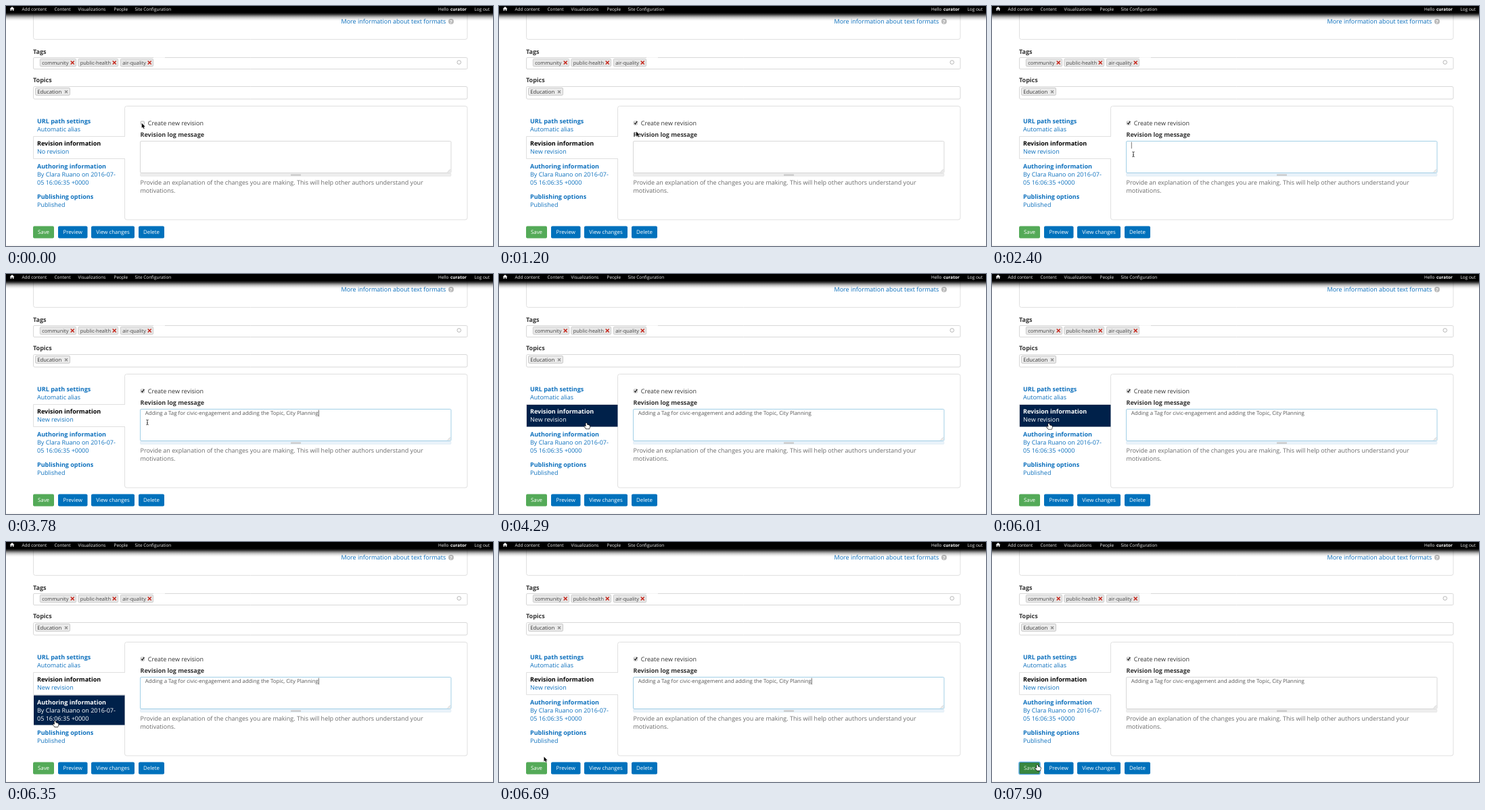
An HTML page with a canvas for the animation above (8 s loop, 720 by 356 pixels).

```html
<!DOCTYPE html>
<html lang="en">
<head>
<meta charset="utf-8">
<title>Revision form</title>
<style>
html, body { margin: 0; width: 100%; height: 100%; overflow: hidden; background: #fff; }
canvas { display: block; width: 720px; height: 356px; }
</style>
</head>
<body>
<canvas id="stage"></canvas>
<script>
const W = 720, H = 356, LOOP = 8000, STEP = 171.65;
const FONT = '"Open Sans", sans-serif';
const LINK = '#0d70bd', INK = '#333', GREY = '#6a6a6a', NAVY = '#00214a';
const EDGE = '#e0e0e0', FIELD = '#d8d8d8';
const MESSAGE = 'Adding a Tag for civic-engagement and adding the Topic, City Planning';
const CHECK_AT = 510, FOCUS_AT = 2050, TYPE_FROM = 2400, TYPE_TO = 3600, SAVE_AT = 7030;

const canvas = document.getElementById('stage');
const ctx = canvas.getContext('2d');
const dpr = window.devicePixelRatio || 1;
canvas.width = W * dpr;
canvas.height = H * dpr;
ctx.textRendering = 'geometricPrecision';

// Pointer stops: time, x, y
const PATH = [
  [0, 200.7, 173.8], [850, 200.7, 173.8], [1880, 209, 220], [3780, 209, 220],
  [4640, 84, 221.5], [6000, 84, 221.5], [6350, 72.5, 265.5],
  [6690, 66.5, 318.5], [7030, 67, 330.5], [LOOP, 67, 330.5]
];

const TABS = [
  { top: 160, bottom: 193.5, base: 174, title: 'URL path settings', lines: ['Automatic alias'] },
  { top: 193.5, bottom: 226.5, base: 207.2, title: 'Revision information', lines: [''], active: true },
  { top: 227, bottom: 271.5, base: 241.2, title: 'Authoring information', lines: ['By Clara Ruano on 2016-07-', '05 16:06:35 +0000'] },
  { top: 272, bottom: 306, base: 286.4, title: 'Publishing options', lines: ['Published'] }
];

const BUTTONS = [
  [40, 31, 'Save'], [77, 43.5, 'Preview'], [126, 64, 'View changes'], [196, 38, 'Delete']
];

function text(str, x, y, size = 9, color = INK, weight = 400, align = 'left') {
  ctx.font = `${weight} ${size}px ${FONT}`;
  ctx.fillStyle = color;
  ctx.textAlign = align;
  ctx.fillText(str, x, y);
}

function box(x, y, w, h, r, fill, stroke, line = 1) {
  ctx.beginPath();
  ctx.roundRect(x, y, w, h, r);
  if (fill) { ctx.fillStyle = fill; ctx.fill(); }
  if (stroke) { ctx.strokeStyle = stroke; ctx.lineWidth = line; ctx.stroke(); }
}

function poly(points, color, width) {
  ctx.beginPath();
  points.forEach(([x, y]) => ctx.lineTo(x, y));
  ctx.strokeStyle = color;
  ctx.lineWidth = width;
  ctx.stroke();
}

function cross(x, y, r, color, width) {
  poly([[x - r, y - r], [x + r, y + r]], color, width);
  poly([[x + r, y - r], [x - r, y + r]], color, width);
}

function circle(x, y, r, fill, stroke) {
  box(x - r, y - r, r * 2, r * 2, r, fill, stroke);
}

function toolbar() {
  const shade = ctx.createLinearGradient(0, 0, 0, 22);
  [[0, 1], [0.45, 1], [0.55, 0.82], [0.65, 0.52], [0.75, 0.27], [0.87, 0.09], [1, 0]]
    .forEach(([p, a]) => shade.addColorStop(p, `rgba(0,0,0,${a})`));
  ctx.fillStyle = shade;
  ctx.fillRect(0, 0, W, 22);
  ctx.fillStyle = '#fff';
  ctx.fill(new Path2D('M9 1 L12.5 4.3 H11.4 V7 H9.8 V5 H8.2 V7 H6.6 V4.3 H5.5 Z'));
  [['Add content', 23.5], ['Content', 71.5], ['Visualizations', 106.5], ['People', 159.5],
   ['Site Configuration', 190.5], ['Hello', 639], ['Log out', 692.5]]
    .forEach(([label, x]) => text(label, x, 6.9, 6.45, '#f4f4f4'));
  text('curator', 657, 6.9, 6.45, '#fff', 700);
}

function fields() {
  box(40.5, -10, 641.5, 59.5, 3, '#fff', EDGE);
  text('More information about text formats', 495.5, 26, 9, LINK);
  circle(658, 23, 4, '#bbb');
  text('?', 658, 25.6, 7, '#fff', 700, 'center');

  text('Tags', 40, 70.7, 9, INK, 700);
  box(40.5, 76.5, 641.5, 17, 1.5, '#fff', FIELD);
  poly([[218, 76.5], [235, 76.5]], '#f4f4f4', 1);
  [[50, 54, 'community'], [106.5, 59.5, 'public-health'], [169, 49, 'air-quality']].forEach(([x, w, label]) => {
    box(x + 0.3, 78.4, w - 0.6, 11.2, 1.5, '#e6e6e6', '#c6c6c6', 0.8);
    text(label, x + 3.2, 86.7, 7.45, '#444');
    cross(x + w - 5.8, 84, 2.5, '#c6281c', 1.5);
  });
  circle(669.8, 83.5, 2.8, null, '#b5b5b5');

  text('Topics', 40, 113, 9, INK, 700);
  box(40.5, 119.5, 641.5, 18.5, 2, '#fff', FIELD);
  box(43.5, 121.5, 51, 10.8, 1.5, '#ebebeb', '#c4c4c4', 0.9);
  text('Education', 46.3, 129.6, 7.75, INK);
  cross(89, 127.2, 2, '#8c8c8c', 1.3);
}

function tabs(hover, status) {
  box(175.5, 148.5, 506.5, 168.5, 3, '#fff', EDGE);
  TABS.forEach((tab, i) => {
    const over = i === hover;
    if (tab.active) {
      ctx.fillStyle = '#fff';
      ctx.fillRect(170, tab.top, 7, tab.bottom - tab.top);
      poly([[176, 193.5], [40.5, 193.5], [40.5, 226.5], [176, 226.5]], EDGE, 1);
    }
    if (over) {
      ctx.fillStyle = NAVY;
      ctx.fillRect(41, tab.top + 0.5, 134.5, tab.bottom - tab.top - 0.5);
    }
    text(tab.title, 46, tab.base, 9, over ? '#fff' : tab.active ? '#000' : LINK, 700);
    tab.lines.forEach((line, n) =>
      text(line || status, 46, tab.base + 11.8 * (n + 1), 9, over ? '#fff' : LINK));
  });
}

function logForm(t, checked, focused) {
  box(199.2, 171, 5.2, 5.2, 1, '#f5f5f5', '#aaa', 0.8);
  if (checked) poly([[200.2, 173.4], [201.6, 175.2], [204.2, 170.8]], '#222', 1.3);
  text('Create new revision', 209.8, 177);
  text('Revision log message', 198.5, 194.3, 9, INK, 700);

  box(198.5, 248, 459.5, 4.4, 1, focused ? '#e8f2fa' : '#eee', focused ? '#dfebf4' : '#e2e2e2', 0.6);
  box(421, 249.4, 15, 2.4, 0.5, '#c8c8c8');
  box(198.5, 200.5, 459.5, 47, 1.5, '#fff', focused ? '#a2cfe6' : FIELD);
  poly([[652.8, 246.5], [657, 242.3]], '#aaa', 0.7);
  poly([[655, 246.5], [657, 244.5]], '#aaa', 0.7);

  const part = Math.min(1, Math.max(0, (t - TYPE_FROM) / (TYPE_TO - TYPE_FROM)));
  const typed = MESSAGE.slice(0, Math.round(part * MESSAGE.length));
  text(typed, 205.8, 209.2, 7.9, '#555');
  const caret = t < TYPE_TO || Math.floor((t - TYPE_TO) / 450) % 2 === 0;
  if (focused && caret) {
    const x = 206.3 + ctx.measureText(typed).width;
    poly([[x, 201.7], [x, 211.5]], '#555', 0.8);
  }

  text('Provide an explanation of the changes you are making. This will help other authors understand your', 198.5, 265.4, 9.01, GREY);
  text('motivations.', 198.5, 277, 9.01, GREY);
}

function buttons(overSave, pressed) {
  BUTTONS.forEach(([x, w, label], i) => {
    box(x, 326.5, w, 18, 2, i ? '#0071bc' : overSave ? '#39873f' : '#54aa58');
    if (!i && pressed) {
      box(x, 326.5, w, 18, 2, null, '#58a9e0', 1.6);
      box(x + 1.3, 327.8, w - 2.6, 15.4, 1, null, '#2f7438', 0.7);
    }
    text(label, x + w / 2, 338.3, 7.9, !i && overSave ? '#dcebdc' : '#fff', 400, 'center');
  });
  ctx.fillStyle = '#f8f8f8';
  ctx.fillRect(0, 354, W, 2);
}

const ARROW = new Path2D('M0 0 V7 L1.6 5.6 L2.8 8.2 L4 7.7 L2.9 5.2 H5 Z');
const HAND = new Path2D('M-.9 .7 Q0 -.5 .8 .7 L1.1 3 Q2 2.4 2.6 3.2 Q3.6 2.8 4 3.7 Q5 3.6 5 4.8 Q5 7 4 8.6 H-.4 Q-1.6 6.8 -3 5.4 Q-2.9 4.3 -1.6 4.8 L-.6 5.2 Z');
const BEAM = new Path2D('M-1.7 -3.7 Q0 -3.7 0 -2.9 Q0 -3.7 1.7 -3.7 M0 -3 V3 M-1.7 3.7 Q0 3.7 0 2.9 Q0 3.7 1.7 3.7 M-.9 .9 H.9');

function pointer(x, y, kind) {
  ctx.save();
  ctx.translate(x, y);
  ctx.lineJoin = 'round';
  if (kind === 'beam') {
    ctx.strokeStyle = '#333';
    ctx.lineWidth = 0.9;
    ctx.stroke(BEAM);
  } else {
    const hand = kind === 'hand', path = hand ? HAND : ARROW;
    ctx.strokeStyle = hand ? '#111' : '#fff';
    ctx.lineWidth = hand ? 1.3 : 1.2;
    ctx.stroke(path);
    ctx.fillStyle = hand ? '#fff' : '#000';
    ctx.fill(path);
  }
  ctx.restore();
}

function pointerAt(t) {
  const i = Math.max(1, PATH.findIndex(stop => stop[0] >= t));
  const [t0, x0, y0] = PATH[i - 1], [t1, x1, y1] = PATH[i];
  const p = (t - t0) / (t1 - t0), e = p * p * (3 - 2 * p);
  return [x0 + (x1 - x0) * e, y0 + (y1 - y0) * e];
}

function hold(t) {
  const start = n => Math.round(n * STEP / 10) * 10;
  let n = Math.min(46, Math.floor(t / STEP) + 1);
  while (start(n) > t) n--;
  return start(n);
}

function draw(now) {
  const t = hold(now % LOOP);
  const [x, y] = pointerAt(t);
  const hover = x > 40 && x < 175 ? TABS.findIndex(tab => y >= tab.top && y < tab.bottom) : -1;
  const overSave = x > 40 && x < 71 && y > 326;
  const inArea = x > 198 && x < 658 && y > 200 && y < 248;
  const checked = t >= CHECK_AT;

  ctx.setTransform(dpr, 0, 0, dpr, 0, 0);
  ctx.fillStyle = '#fff';
  ctx.fillRect(0, 0, W, H);
  fields();
  toolbar();
  tabs(hover, checked ? 'New revision' : 'No revision');
  logForm(t, checked, t >= FOCUS_AT && t < SAVE_AT);
  buttons(overSave, t >= SAVE_AT);
  pointer(x, y, hover >= 0 || overSave ? 'hand' : inArea ? 'beam' : 'arrow');
}

const begin = performance.now();
function tick() {
  draw(performance.now() - begin);
  requestAnimationFrame(tick);
}
tick();
</script>
</body>
</html>
```
